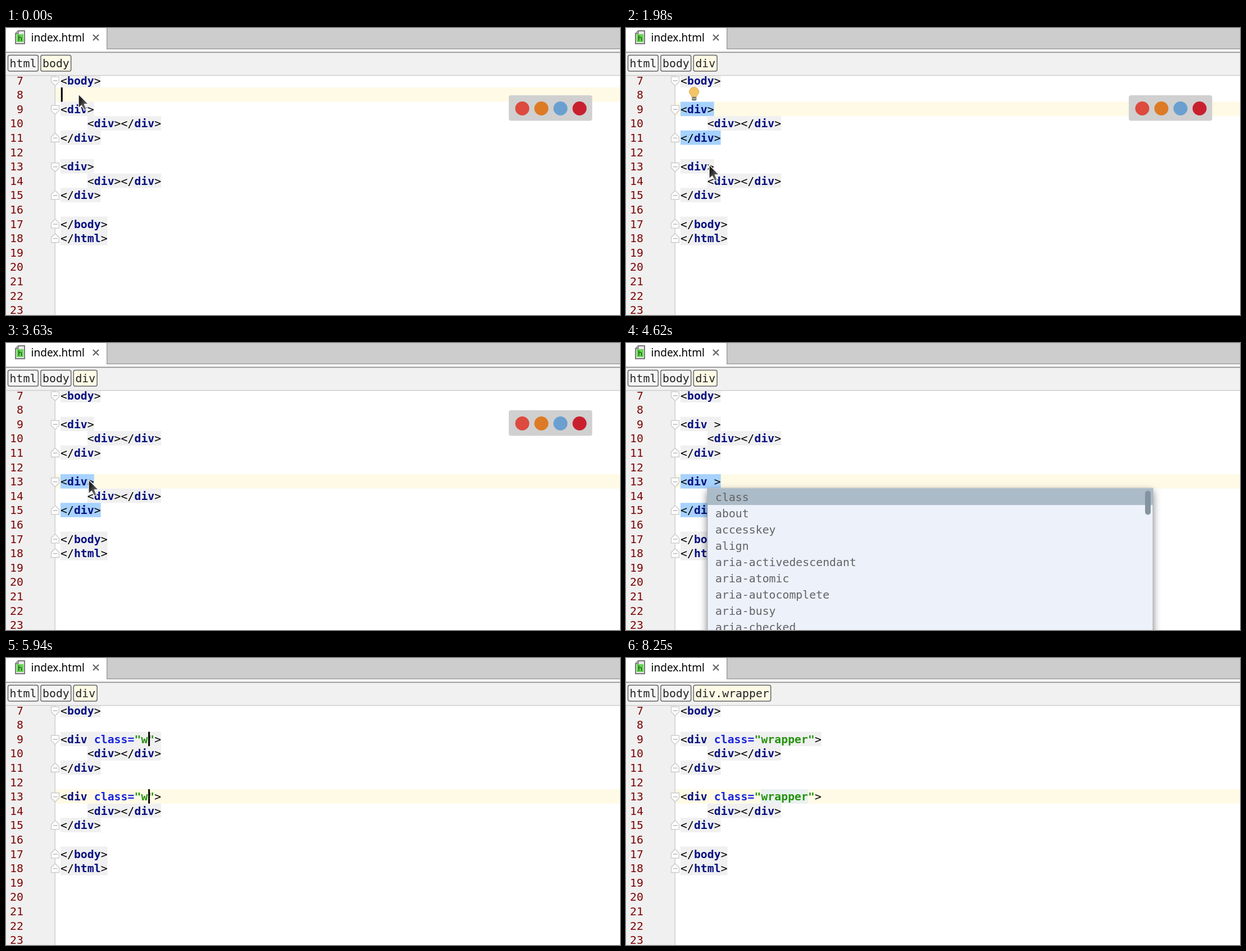
An HTML page for the animation above (8580 ms loop, 1093x512 px).

```html
<!DOCTYPE html>
<html lang="en">
<head>
<meta charset="utf-8">
<title>Editing two tags at once</title>
<style>
html, body { margin: 0; width: 100%; height: 100%; overflow: hidden; background: #fff; }
svg { display: block; }
text { white-space: pre; }
.mono { font: 19.85px "DejaVu Sans Mono", monospace; }
.bold { font-weight: bold; }
.ui { font: 19.1px "Noto Sans", sans-serif; }
.sym { font: 16px "DejaVu Sans", sans-serif; }
.pop { filter: drop-shadow(0 6px 7px rgba(0, 0, 0, .5)); }
</style>
</head>
<body>
<svg width="1093" height="512" viewBox="0 0 1093 512">
  <defs>
    <linearGradient id="arrow" x2="1" y2="1">
      <stop offset=".3" stop-color="#222"/><stop offset="1" stop-color="#999"/>
    </linearGradient>
  </defs>
  <g id="code"></g>
  <g id="header"></g>
  <g id="over"></g>
</svg>
<script>
(() => {
const STEP = 330, LOOP = 8580;
const CH = 11.95, LEFT = 97, PITCH = 25.6, TOP = 80.4;
const $ = id => document.getElementById(id);

// Each step lists only what changes from the one before.
const steps = [
  { line: 8, caret: 1, mouse: [129, 118], web: 1, bulb: 0, attr: '', crumb: '', pop: '' },
  { mouse: [134, 123] },
  { mouse: [148, 139], caret: 0 },
  { line: 9, caret: 1, crumb: 'div', mouse: [147, 141] },
  { caret: 0 },
  { caret: 1, bulb: 1, mouse: [147, 195] },
  { caret: 0, mouse: [148, 244] },
  { line: 13, caret: 1, bulb: 0, mouse: [147, 244] },
  { caret: 0 },
  { caret: 1 },
  {},
  { caret: 0 },
  { caret: 1, mouse: null, web: 0, attr: ' ' },
  {},
  { caret: 0, pop: 'list' },
  { caret: 1, pop: '', attr: ' class=""' },
  { pop: 'quote' },
  { caret: 0 },
  { caret: 1, pop: '', attr: ' class="w"' },
  { crumb: 'div.w' },
  { attr: ' class="wrap"' },
  { attr: ' class="wrapper"' },
  { caret: 0, crumb: 'div.wrapper' },
  {},
  { caret: 1 },
  { caret: 0 }
];
const states = [];
steps.forEach((s, i) => states.push({ ...states[i - 1], ...s }));

const attributes = ['class', 'about', 'accesskey', 'align', 'aria-activedescendant',
  'aria-atomic', 'aria-autocomplete', 'aria-busy', 'aria-checked'];

const esc = s => s.replace(/&/g, '&amp;').replace(/</g, '&lt;').replace(/>/g, '&gt;');
const rect = (x, y, w, h, fill, more = '') =>
  `<rect x="${x}" y="${y}" width="${w}" height="${h}" fill="${fill}" ${more}/>`;
const text = (x, y, s, fill = '#000', cls = 'mono', more = '') =>
  `<text x="${x}" y="${y}" fill="${fill}" class="${cls}" ${more}>${esc(s)}</text>`;
const path = (d, fill, stroke, more = '') =>
  `<path d="${d}" fill="${fill}" stroke="${stroke}" ${more}/>`;
const rowTop = n => TOP + (n - 7) * PITCH;

function tokens(x, y, s) {
  let out = '';
  for (const m of s.matchAll(/<\/?|>|"[^"]*"|class=|\w+/g)) {
    const t = m[0], plain = /^[<>]/.test(t);
    const fill = plain ? '#000' : t[0] === '"' ? '#26930f' : t === 'class=' ? '#1a24e0' : '#06107f';
    out += text(x + m.index * CH, y, t, fill, plain ? 'mono' : 'mono bold');
  }
  return out;
}

function fold(n, up) {
  const y = rowTop(n) + 13.6, d = up ? -1 : 1;
  return path(`M80.5 ${y - 7 * d}H94.5V${y + 2 * d}L87.5 ${y + 9 * d}L80.5 ${y + 2 * d}Z`,
    '#fff', '#cfcfcf', 'stroke-width="1.6"') +
    path(`M84 ${y}H91.5`, 'none', '#bbb', 'stroke-width="1.6"');
}

function code(s) {
  const open = `<div${s.attr}>`;
  const rows = { 7: '<body>', 9: open, 10: '<div></div>', 11: '</div>', 13: open,
    14: '<div></div>', 15: '</div>', 17: '</body>', 18: '</html>' };
  const inValue = s.attr.length > 9;
  let out = rect(0, 84, 87, 428, '#f0f0f0') +
    rect(88, rowTop(s.line), 1005, PITCH, '#fefae5') + rect(86.5, 84, 1.6, 428, '#d2d2d2');
  for (let n = 7; n <= 23; n++) {
    const y = rowTop(n), num = String(n);
    out += text(31 - num.length * CH, y + 20.2, num, '#7d0505');
    if (!rows[n]) continue;
    const x = LEFT + (n === 10 || n === 14 ? 4 * CH : 0), w = rows[n].length * CH;
    const paired = s.line > 8 && !inValue && (n === s.line || n === s.line + 2);
    if (paired) out += rect(x, y, w, PITCH, '#a7d2fd');
    else if (n !== s.line) out += rect(x, y, w, PITCH, '#f0f0f0');
    const named = s.crumb.length - 4;
    if (n === 13 && named > 0) out += rect(x + 12 * CH, y, named * CH, PITCH, '#eaf2f1');
    out += tokens(x, y + 20.2, rows[n]);
  }
  for (const n of [7, 9, 13]) out += fold(n, false);
  for (const n of [11, 15, 17, 18]) out += fold(n, true);
  if (s.caret) {
    const col = s.line === 8 ? 0 : 4 + s.attr.length - (s.attr.length > 1 ? 1 : 0);
    for (const n of s.line === 13 ? [9, 13] : [s.line])
      out += rect(LEFT + col * CH + .8, rowTop(n), 3, PITCH, '#000');
  }
  return out;
}

function header(s) {
  let out = rect(0, 0, 1093, 44, '#fff') + rect(180, 0, 913, 37, '#cdcdcd') +
    rect(179, 0, 1.5, 38, '#a0a0a0') + rect(180, 36.5, 913, 1.5, '#a0a0a0') +
    rect(0, 42.5, 1093, 2, '#8c8c8c') + rect(0, 44.5, 1093, 40, '#f1f1f1') +
    rect(0, 84, 1093, 1.3, '#cacaca');
  out += path('M22 5H33V28H17V10Z', '#e9e9e9', '#777', 'stroke-width="2"') +
    path('M17 10H22V5', '#bbb', '#777', 'stroke-width="1.5"') +
    rect(19, 11, 12, 14, '#62d84e') +
    text(21, 22.5, 'h', '#123c0c', 'sym', 'style="font-size:13px"');
  out += text(44.5, 23.5, 'index.html', '#000', 'ui') +
    path('M155 12L165 22M165 12L155 22', 'none', '#6a6a6a', 'stroke-width="2.4"');
  const crumbs = ['html', 'body', s.crumb].filter(Boolean);
  let x = 3;
  crumbs.forEach((c, i) => {
    const w = c.length * CH + 7;
    out += rect(x + .5, 48.5, w - 1, 28.5, i === crumbs.length - 1 ? '#fefae5' : '#f5f5f5',
      'rx="3" stroke="#666" stroke-width="1.5"') + text(x + 3.6, 70, c, '#222');
    x += w + 3.6;
  });
  return out;
}

function popup(kind) {
  const dim = '#626466';
  if (kind === 'list') {
    let out = '<g class="pop">' + rect(145, 259, 793, 300, '#edf1fa', 'stroke="#aab2ba"') + '</g>' +
      rect(145, 259.5, 793, 29.5, '#acbbc8') +
      rect(924, 263.5, 10, 43, '#8593a0', 'rx="5"');
    attributes.forEach((a, i) => out += text(159, 281.5 + i * 29.05, a, dim));
    return out;
  }
  if (kind !== 'quote') return '';
  return '<g class="pop">' + rect(216.5, 259, 793, 55.5, '#f4f4f4', 'stroke="#aab2ba"') + '</g>' +
    rect(216.5, 259.5, 793, 29, '#acbbc8') +
    text(230, 281.5, '"', '#75569a') + text(925.5, 281.5, 'Quotes', dim) +
    text(220, 307, '^↓', '#000', 'sym') + text(251, 307, 'and', '#000', 'ui') +
    text(291, 307, '^↑', '#000', 'sym') +
    text(324, 307, 'will move caret down and up in the editor', '#000', 'ui') +
    text(707, 307, '>>', '#0b1be0', 'sym', 'style="font-size:18px;text-decoration:underline"');
}

function over(s) {
  let out = '';
  if (s.web) {
    out += rect(895, 120, 148.5, 45.5, '#d0d0d0', 'rx="4"');
    ['#dc4b3e', '#dd7a25', '#6a9fd0', '#c9202e'].forEach((c, i) =>
      out += `<circle cx="${919 + i * 34}" cy="143.5" r="12.5" fill="${c}"/>`);
  }
  if (s.bulb) {
    out += path('M117 123C117 119 112.5 118 112.5 113.5A8.7 8.7 0 0 1 129.8 113.5C129.8 118 125.5 119 125.5 123Z',
      '#f3c566', '#d9a441') +
      rect(117, 123, 8.5, 6.5, '#77777c', 'rx="2"') + rect(117, 125.5, 8.5, 1.2, '#ccc');
  }
  out += popup(s.pop);
  if (s.mouse) {
    out += `<g transform="translate(${s.mouse})">` +
      path('M0 0V25L5.5 20L10 29L14.5 27L10.5 18H18Z', 'url(#arrow)', '#fff', 'stroke-width="1.3"') + '</g>';
  }
  return out;
}

let shown = -1;
function tick() {
  const i = Math.floor(performance.now() % LOOP / STEP);
  if (i !== shown) {
    shown = i;
    const s = states[i];
    $('code').innerHTML = code(s);
    $('header').innerHTML = header(s);
    $('over').innerHTML = over(s);
  }
  requestAnimationFrame(tick);
}
tick();
})();
</script>
</body>
</html>
```
